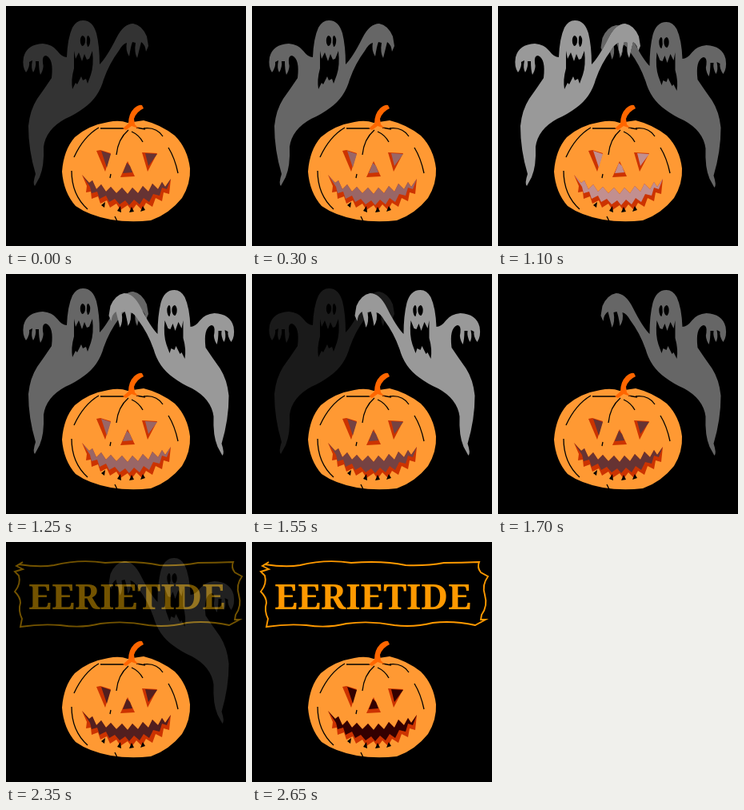
These frames come from a looping animation (300 by 300 pixels, 4650 ms). An HTML page with a canvas:

```html
<!DOCTYPE html>
<html lang="en">
<head>
<meta charset="utf-8">
<title>Pumpkin and ghosts</title>
<style>
html, body { margin: 0; width: 100%; height: 100%; overflow: hidden; background: #000; }
canvas { display: block; width: 300px; height: 300px; }
</style>
</head>
<body>
<canvas id="stage" width="300" height="300"></canvas>
<script>
const ctx = document.getElementById('stage').getContext('2d');
const LOOP = 4650;
const TITLE = 'EERIETIDE';

// start time, left ghost, right ghost, inner glow, title
const STEPS = [
  [0, .2, 0, 1, 0],
  [150, .3, 0, 1.5, 0],
  [300, .4, 0, 2, 0],
  [800, .6, .2, 3, 0],
  [950, .8, .3, 3.6, 0],
  [1100, .6, .4, 2.8, 0],
  [1250, .4, .6, 2, 0],
  [1400, .2, .8, 1.7, 0],
  [1550, .1, .6, 1.3, 0],
  [1700, 0, .4, 1, 0],
  [2200, 0, .2, 1, .2],
  [2350, 0, .13, .6, .45],
  [2500, 0, .07, .3, .7],
  [2650, 0, 0, 0, 1]
];

const path = d => new Path2D(d);
const poly = (...pts) => path('M' + pts.join(' ') + 'Z');

const ghost = path(
  'M96 18C105 18 110 24 113 34Q117 50 117 73Q126 64 138 40Q147 22 159 22Q170 24 176 38' +
  'L178 50L175 57Q174 48 169 45L164 65Q160 58 162 46L158 45Q156 50 154 63Q149 55 151 46' +
  'Q146 47 141 56Q129 72 122 92Q116 114 98 127Q86 136 74 141Q50 154 47 176' +
  'Q48 200 42 214L36 225Q33 222 37 210Q28 180 28 150Q30 130 39 116Q49 102 57 90' +
  'Q60 66 50 62Q45 62 46 71Q48 78 43 86Q41 80 41 69L37 69Q38 76 34 83Q31 78 33 68L29 70' +
  'Q30 76 25 83Q20 76 22 64Q26 48 46 47Q58 48 64 56Q70 64 76 64Q77 40 83 27Q88 18 96 18Z');
ghost.addPath(path(
  'M96 37Q100 39 99 45Q98 50 95 50Q92 46 93 41Q94 37 96 37Z' +
  'M103 37Q106 40 105 46Q104 51 102 51Q100 46 101 41Q101 37 103 37Z' +
  'M85 56L87 66L91 58L95 69L98 60L101 67L104 66L108 56Q110 74 106 86L102 97L100 91' +
  'L96 93L94 88L89 98L87 96L83 104Q81 92 85 78Z'));

const body = path(
  'M152 146Q142 142 128 145Q103 149 86 164Q72 180 70 207Q72 233 87 250Q104 262 131 267' +
  'Q155 271 181 268Q204 260 220 240Q231 222 230 203Q227 178 211 162Q193 148 172 143Z');
const stem = path(
  'M146 153L153 147Q153 135 160 128Q166 123 170 124L172 128Q163 132 160 141L161 148' +
  'L166 153L157 150L150 155Z');
const ribs = path(
  'M116 152Q97 163 85 189M118 153L148 153M163 152L174 154M172 153Q188 151 196 163' +
  'M203 177Q211 190 215 209M153 155Q140 166 138 186M157 157Q166 161 171 170' +
  'M82 206Q82 236 102 254M136 263L139 269M131 210L130 215');

const sockets = [
  poly(113, 181, 118, 180, 131, 184, 124, 207),
  poly(170, 183, 189, 184, 177, 207),
  poly(152, 194, 161, 213, 143, 214)
];
const hollows = [
  poly(119, 181, 131, 185, 126, 202),
  poly(174, 184, 189, 185, 178, 200),
  poly(151, 196, 155, 200, 158, 208, 146, 209)
];

const smileTop =
  'M95 211L104 221L108 218L113 229L119 223L125 232L131 226L138 234L145 227L152 235' +
  'L158 227L165 234L171 225L178 232L183 222L190 229L195 220L199 226L206 216';
const smile = path(smileTop +
  'L204 235L197 233L195 244L187 240L183 251L175 246L170 255L163 248L157 256L152 249' +
  'L143 255L138 247L130 252L126 243L118 247L115 238L107 241L106 232L100 233L101 225Z');
const smileHollow = path(smileTop +
  'L201 229L195 227L192 237L184 235L179 245L172 240L167 248L160 242L154 249L149 243' +
  'L142 248L136 241L129 245L125 237L117 241L114 232L107 234L105 226Z');
const slits = path(
  'M119 249L124 245L123 252ZM139 256L143 250L144 258ZM154 258L157 251L160 257Z' +
  'M168 257L171 250L174 255Z');

const border = path(
  'M16 28Q42 32 60 29Q92 21 124 26Q164 23 192 29Q218 30 240 26Q262 26 284 25' +
  'Q281 32 286 38L295 43Q287 54 291 66Q295 80 287 91L286 97L292 97L279 104' +
  'Q252 98 226 101Q202 107 178 104Q148 98 118 102Q94 108 68 104Q44 102 18 106' +
  'L20 96Q15 86 18 76Q18 69 11 62Q19 52 16 42L11 37L21 34L13 30L21 25');

function fill(shape, color, rule = 'nonzero') {
  ctx.fillStyle = color;
  ctx.fill(shape, rule);
}

function drawGhost(level, mirrored) {
  if (!level) return;
  const v = Math.round(255 * level);
  ctx.save();
  ctx.globalCompositeOperation = 'lighten';
  if (mirrored) ctx.transform(-1, 0, 0, 1, 306.5, 2);
  fill(ghost, `rgb(${v},${v},${v})`, 'evenodd');
  ctx.restore();
}

function drawPumpkin(glow) {
  const v = Math.round(51 * glow);
  const inner = `rgb(${51 + v},${v},${v})`;
  fill(body, '#f93');
  ctx.strokeStyle = '#000';
  ctx.lineWidth = 1.3;
  ctx.stroke(ribs);
  fill(stem, '#f60');
  sockets.forEach(s => fill(s, '#c30'));
  hollows.forEach(h => fill(h, inner));
  fill(smile, '#c30');
  fill(smileHollow, inner);
  fill(slits, '#000');
}

function setTitleFont() {
  const font = size => `bold ${size}px "Noto Serif ExtraCondensed", ` +
    '"Noto Serif Condensed", "Noto Serif", "Liberation Serif", serif';
  ctx.font = font(100);
  const size = Math.min(58, 100 * 246 / ctx.measureText(TITLE).width);
  ctx.font = font(size);
  ctx.textAlign = 'center';
}

// The title adds its light to whatever lies behind it.
function drawTitle(level) {
  if (!level) return;
  const green = 51 + 102 * (level - .2) / .8;
  const color = `rgb(${Math.round(255 * level)},${Math.round(green)},0)`;
  ctx.save();
  ctx.globalCompositeOperation = 'lighter';
  ctx.strokeStyle = ctx.fillStyle = color;
  ctx.lineWidth = 1.9;
  ctx.stroke(border);
  const { actualBoundingBoxAscent: height } = ctx.measureText(TITLE);
  ctx.fillText(TITLE, 151, 68.5 + height / 2);
  ctx.restore();
}

function draw(now) {
  const t = now % LOOP;
  const [, left, right, glow, title] = STEPS.findLast(s => s[0] <= t);
  ctx.fillStyle = '#000';
  ctx.fillRect(0, 0, 300, 300);
  drawGhost(left, false);
  drawGhost(right, true);
  drawPumpkin(glow);
  drawTitle(title);
}

setTitleFont();
const start = performance.now();
function tick() {
  draw(performance.now() - start);
  requestAnimationFrame(tick);
}
tick();
</script>
</body>
</html>
```
